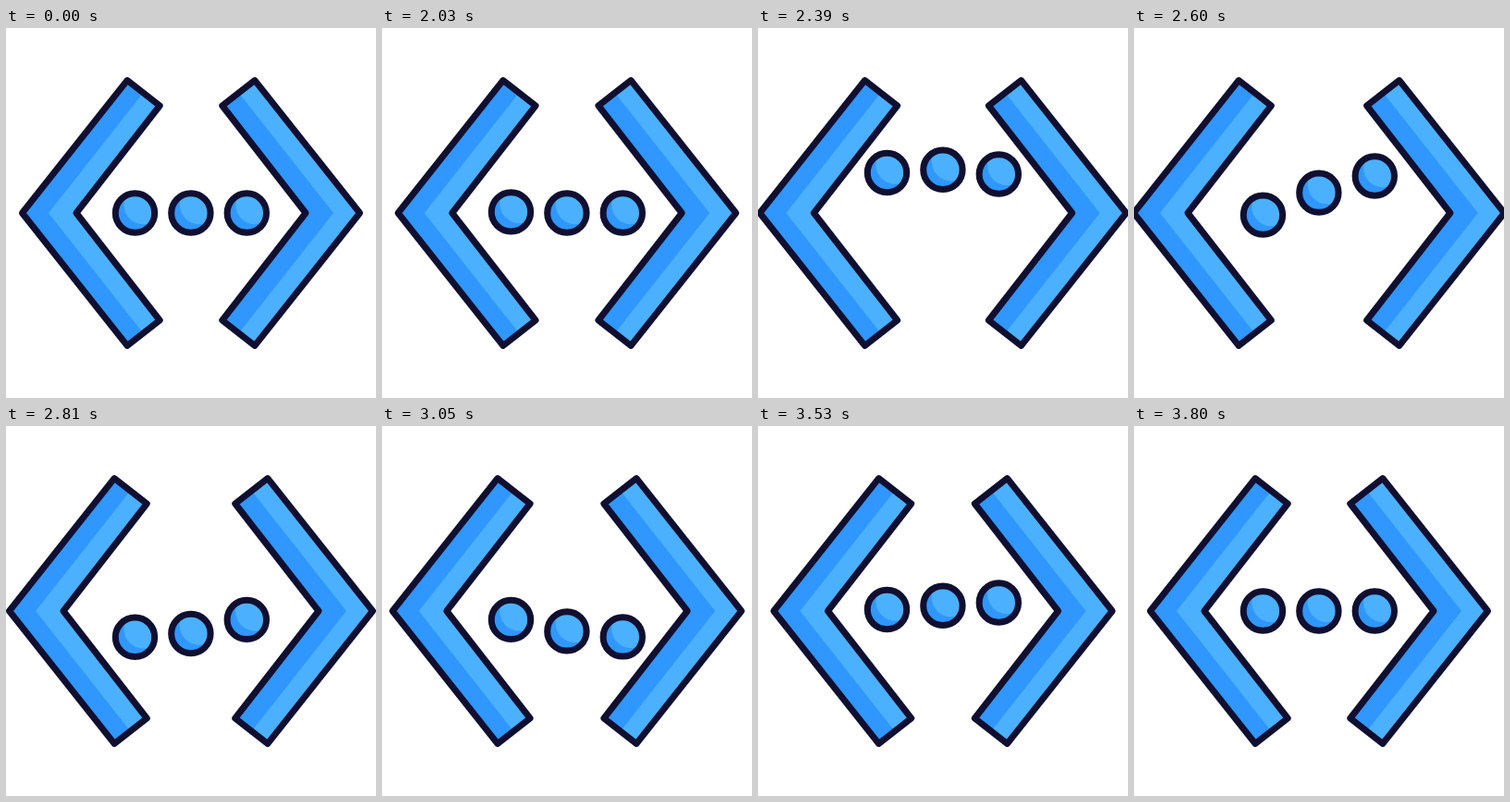
These frames come from a looping animation (400x400 px, 3830 ms). An HTML page with a canvas:

```html
<!DOCTYPE html>
<html lang="en">
<head>
<meta charset="utf-8">
<title>Code brackets</title>
<style>
html, body { margin: 0; width: 100%; height: 100%; overflow: hidden; background: #fff; }
canvas { display: block; width: 400px; height: 400px; }
</style>
</head>
<body>
<canvas id="stage" width="400" height="400"></canvas>
<script>
const ctx = document.getElementById('stage').getContext('2d');
const LOOP = 3830, START = 2000, STEP = 30, STAGGER = 90;
const INK = '#110f30', DARK = '#2f97fd', LIGHT = '#4bb1fe';

// Height keys of a dot: [time, offset], with short rests at the turns
const HOPS = [
  [0, 0], [270, -46.8], [320, -46.8], [795, 28.3], [840, 28.3],
  [1260, -9.5], [1300, -9.5], [1620, 0]
];

// Cubic ease with control points (x1, 0) and (x2, 1)
function ease(p, x1, x2) {
  let lo = 0, hi = 1;
  for (let i = 0; i < 24; i++) {
    const s = (lo + hi) / 2, r = 1 - s;
    if (3 * r * r * s * x1 + 3 * r * s * s * x2 + s * s * s < p) lo = s;
    else hi = s;
  }
  return lo * lo * (3 - 2 * lo);
}

function hop(u) {
  if (u <= 0) return 0;
  for (let i = 1; i < HOPS.length; i++) {
    const [t0, y0] = HOPS[i - 1], [t1, y1] = HOPS[i];
    if (u < t1) return y0 + (y1 - y0) * ease((u - t0) / (t1 - t0), 0.42, 0.58);
  }
  return 0;
}

function spread(u) {
  const peak = 540, end = 1800;
  if (u <= 0 || u >= end) return 0;
  return u < peak
    ? 18 * ease(u / peak, 0.33, 0.55)
    : 18 * (1 - ease((u - peak) / (end - peak), 0.33, 0.2));
}

function polygon(pts, flip) {
  const path = new Path2D();
  for (const [x, y] of pts) path.lineTo(flip ? 400 - x : x, y);
  path.closePath();
  return path;
}

function disc(x, y, r) {
  const path = new Path2D();
  path.arc(x, y, r, 0, Math.PI * 2);
  return path;
}

const OUTLINE = [[131, 56.6], [166.2, 84], [76, 200], [166.2, 316], [131, 343.4], [17.5, 200]];
// Half plane bounded by the middle line of a bracket, closed at x = far
const half = far => [[far, 0], [203.5, 0], [46, 200], [203.5, 400], [far, 400]];

const left = { body: polygon(OUTLINE), lit: polygon(half(300)) };
const right = { body: polygon(OUTLINE, true), lit: polygon(half(-100), true) };
const dot = { body: disc(0, 0, 21.2), lit: disc(9, -9, 21.2) };

function paint({ body, lit }, x, y) {
  ctx.save();
  ctx.translate(x, y);
  ctx.fillStyle = DARK;
  ctx.fill(body);
  ctx.save();
  ctx.clip(body);
  ctx.fillStyle = LIGHT;
  ctx.fill(lit);
  ctx.restore();
  ctx.strokeStyle = INK;
  ctx.lineWidth = 7;
  ctx.lineJoin = 'round';
  ctx.stroke(body);
  ctx.restore();
}

function draw(t) {
  const u = Math.max(0, Math.floor((t - START) / STEP) * STEP);
  const dx = spread(u);
  ctx.fillStyle = '#fff';
  ctx.fillRect(0, 0, 400, 400);
  paint(left, -dx, 0);
  paint(right, dx, 0);
  for (let i = 0; i < 3; i++) {
    paint(dot, 139.5 + i * 60.4, 200 + hop(u - i * STAGGER));
  }
}

const began = performance.now();
function tick() {
  draw((performance.now() - began) % LOOP);
  requestAnimationFrame(tick);
}
tick();
</script>
</body>
</html>
```
